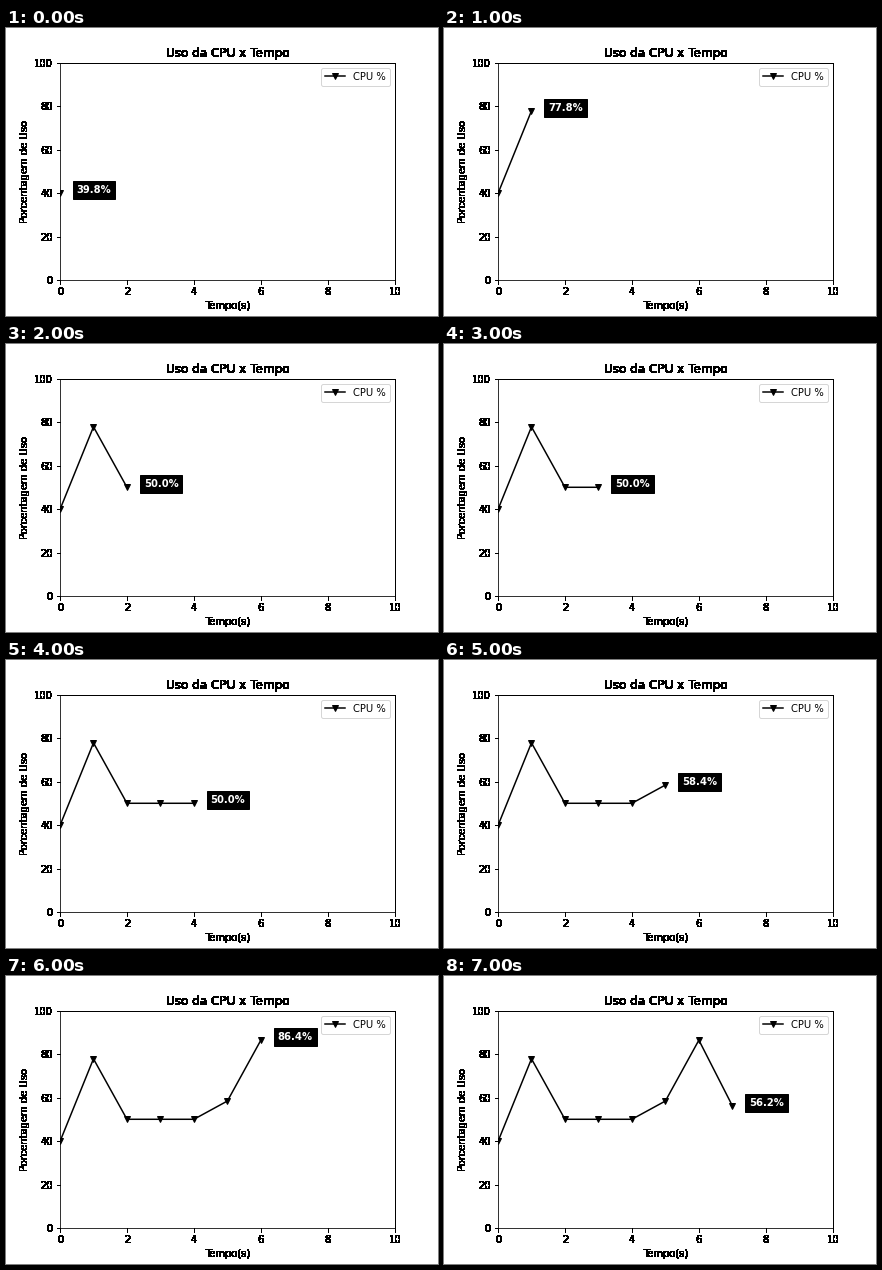
Recreate the animation shown at these times as a matplotlib script. Size 432 px wide and 288 px high, loop 8000 ms.

```python
import numpy as np
import matplotlib.pyplot as plt
from matplotlib.animation import FuncAnimation

USAGE = [39.8, 77.8, 50.0, 50.0, 50.0, 58.4, 86.4, 56.2]
STEP_MS = 1000

plt.rcParams["font.family"] = "DejaVu Sans"


def harden(image, dpi):
    """Turn every touched pixel solid black, without soft edges."""
    solid = np.zeros_like(image)
    solid[..., 3] = image[..., 3] > 0
    return solid, 0, 0


fig, ax = plt.subplots(figsize=(6, 4), dpi=72, facecolor="white")
fig.subplots_adjust(left=0.125, right=0.9, bottom=0.125, top=0.88)

ax.set(xlim=(0, 10), ylim=(0, 100),
       xticks=range(0, 11, 2), yticks=range(0, 101, 20),
       title="Uso da CPU x Tempo", xlabel="Tempo(s)",
       ylabel="Porcentagem de Uso")

line, = ax.plot([], [], color="black", marker="v", label="CPU %")
ax.legend(loc="upper right")
label = ax.text(0, 0, "", color="white", weight="bold",
                bbox=dict(facecolor="black"))

# Everything outside the plot area has hard, heavy edges.
hard_parts = [ax.title, ax.xaxis.label, ax.yaxis.label,
              ax.spines["top"], ax.spines["right"]]
for axis in (ax.xaxis, ax.yaxis):
    for tick in axis.get_major_ticks():
        hard_parts += [tick.label1, tick.tick1line]
for part in hard_parts:
    part.set_agg_filter(harden)


def update(second):
    line.set_data(range(second + 1), USAGE[:second + 1])
    label.set_position((second + 0.5, USAGE[second]))
    label.set_text(f"{USAGE[second]:.1f}%")
    return line, label


anim = FuncAnimation(fig, update, frames=len(USAGE), interval=STEP_MS,
                     init_func=lambda: update(0), repeat=True,
                     repeat_delay=0, blit=False)
plt.show()
```
